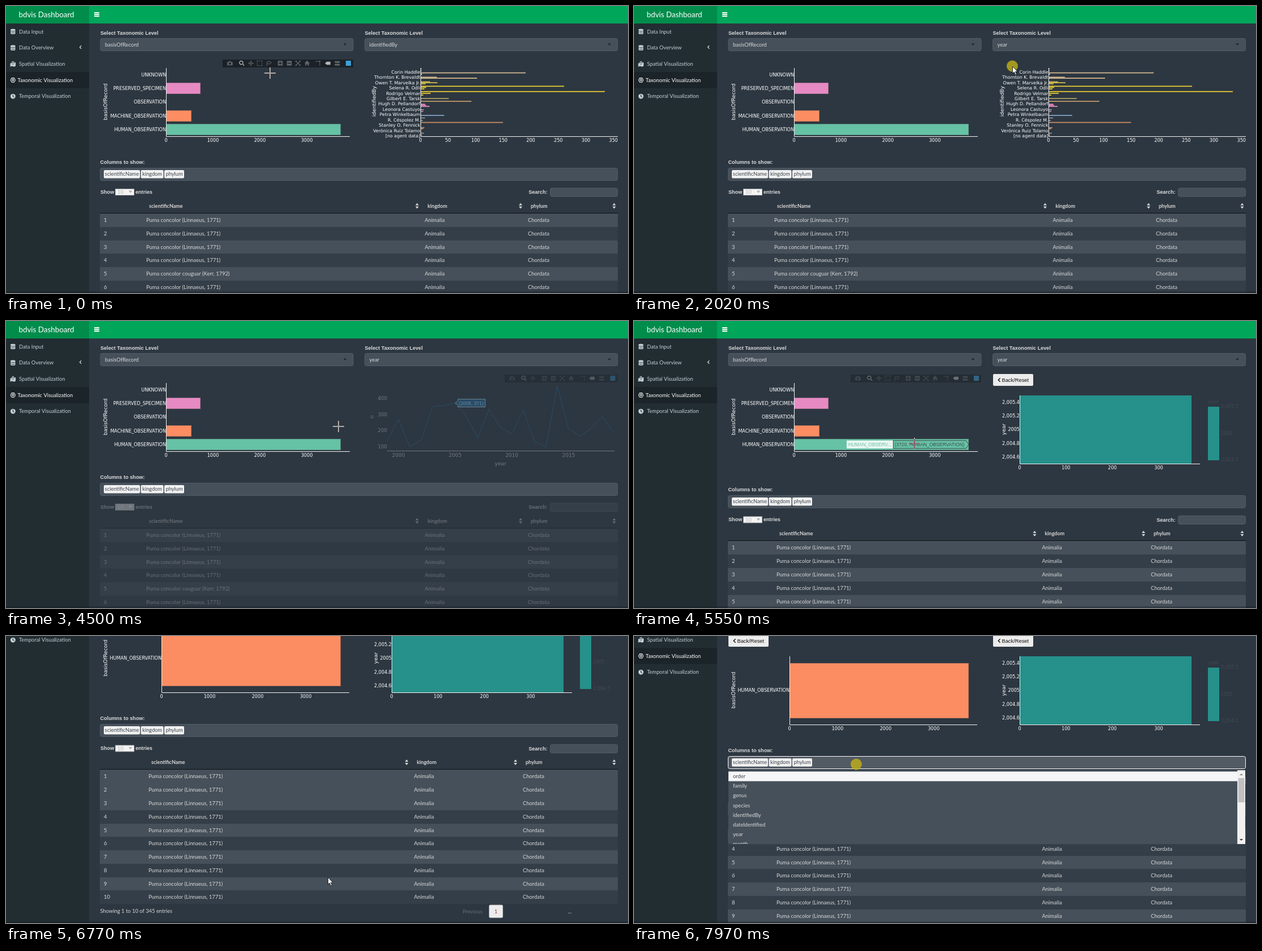
Recreate the animation shown at these times as an HTML page with a canvas. Size 1100x509 px, loop 8 s.

```html
<!DOCTYPE html>
<html lang="en">
<head>
<meta charset="utf-8">
<title>bdvis Dashboard</title>
<style>
html, body { margin: 0; width: 100%; height: 100%; overflow: hidden; background: #2d3741; }
canvas { display: block; width: 1100px; height: 509px; }
</style>
</head>
<body>
<canvas id="stage"></canvas>
<script>
const W = 1100, H = 509, LOOP = 8000;
const canvas = document.getElementById('stage'), c = canvas.getContext('2d');
const dpr = window.devicePixelRatio || 1;
canvas.width = W * dpr;
canvas.height = H * dpr;

const UI = 'Lato, sans-serif', PLOT = '"DejaVu Sans", sans-serif', ARIAL = '"Liberation Sans", sans-serif';
const BG = '#2d3741', PANEL = '#46505a', INK = '#d8d8d8';

// Moments when the page changes
const PICK = 1880, LINE = 2650, DRILL = 4550, DRILL_LEFT = 5850, MENU = 7970;

const ramp = (t, a, b) => Math.min(1, Math.max(0, (t - a) / (b - a)));
const ease = p => p < .5 ? 2 * p * p : 1 - 2 * (1 - p) * (1 - p);
const within = (t, a, b) => t >= a && t < b;

function rect(x, y, w, h, fill) {
  c.fillStyle = fill;
  c.fillRect(x, y, w, h);
}
function round(x, y, w, h, r, fill, stroke) {
  c.beginPath();
  c.roundRect(x, y, w, h, r);
  c.fillStyle = fill;
  c.fill();
  if (stroke) { c.strokeStyle = stroke; c.lineWidth = 1; c.stroke(); }
}
function poly(points, fill, stroke) {
  c.beginPath();
  points.forEach(([x, y]) => c.lineTo(x, y));
  if (fill) { c.closePath(); c.fillStyle = fill; c.fill(); }
  if (stroke) { c.strokeStyle = stroke; c.lineWidth = 1; c.stroke(); }
}
// y is the middle of the capitals; upright baselines sit on whole pixels
function text(s, x, y, { size = 9.4, color = INK, font = UI, align = 'left', bold = false, turn = false } = {}) {
  const drop = size * .36;
  c.save();
  c.translate(x, turn ? y : Math.round(y + drop));
  if (turn) c.rotate(-Math.PI / 2);
  c.font = `${bold ? 'bold ' : ''}${size}px ${font}`;
  c.textAlign = align;
  c.fillStyle = color;
  c.fillText(s, 0, turn ? drop : 0);
  c.restore();
}
const label = (s, x, y, align) => text(s, x, y, { size: 9.1, font: ARIAL, bold: true, align, color: '#dcdcdc' });
const tick = (s, x, y, align = 'center', size = 8.1) => text(s, x, y, { size, align, font: PLOT, color: '#fff' });
const title = (s, x, y) => text(s, x, y, { size: 9.1, align: 'center', font: PLOT, color: '#fff', turn: true });

function group(alpha, draw) {
  if (alpha <= 0) return;
  c.save();
  c.globalAlpha *= alpha;
  draw();
  c.restore();
}
function icon(path, x, y, color, scale = 1) {
  c.save();
  c.translate(x, y);
  c.scale(scale, scale);
  c.translate(-5, -5);
  c.fillStyle = color;
  c.fill(new Path2D(path), 'evenodd');
  c.restore();
}
const ICONS = {
  camera: 'M0 2.5h2.5l1-1.5h3l1 1.5h2.5v6.5h-10zM5 3.5a2 2 0 1 0 .01 0z',
  zoom: 'M4 0a4 4 0 1 0 .01 0zM4 1.5a2.5 2.5 0 1 0 .01 0zM6.5 7.5l1-1 2.5 2.5-1 1z',
  pan: 'M5 0l2 2.5h-1.4v1.9h1.9v-1.4l2.5 2-2.5 2v-1.4h-1.9v1.9h1.4l-2 2.5-2-2.5h1.4v-1.9h-1.9v1.4l-2.5-2 2.5-2v1.4h1.9v-1.9h-1.4z',
  box: 'M0 0h3v1h-2v2h-1zM7 0h3v3h-1v-2h-2zM0 7h1v2h2v1h-3zM9 7h1v3h-3v-1h2zM4 0h2v1h-2zM4 9h2v1h-2zM0 4h1v2h-1zM9 4h1v2h-1z',
  lasso: 'M5.5 1a4.5 3 0 1 0 .01 0zM5.5 2.2a3.3 1.8 0 1 0 .01 0zM1.5 6l1.2.6-1 3.4h-1.2z',
  plus: 'M.5 .5h9v9h-9zM4.3 2v2.3h-2.3v1.4h2.3v2.3h1.4v-2.3h2.3v-1.4h-2.3v-2.3z',
  minus: 'M.5 .5h9v9h-9zM2 4.3h6v1.4h-6z',
  auto: 'M0 0h3l-1 1 3 3 3-3-1-1h3v3l-1-1-3 3 3 3 1-1v3h-3l1-1-3-3-3 3 1 1h-3v-3l1 1 3-3-3-3-1 1z',
  home: 'M5 0l5 5h-1.5v4.5h-2.5v-3h-2v3h-2.5v-4.5h-1.5z',
  spike: 'M0 1h7v1h-7zM7 0h2v3h-2zM7.5 3h1v7h-1z',
  tag: 'M0 5l3-3h7v6h-7z',
  tags: 'M0 2.5l1.5-1.5h8.5v3.5h-8.5zM0 7.5l1.5-1.5h8.5v3.5h-8.5z',
  database: 'M.5 1.6a4.5 1.6 0 0 1 9 0v1a4.5 1.6 0 0 1-9 0zM.5 4.1q4.5 2.4 9 0v1.6a4.5 1.6 0 0 1-9 0zM.5 7.1q4.5 2.4 9 0v1.3a4.5 1.6 0 0 1-9 0z',
  map: 'M0 4l2.5-1 1 2 1.5 2 1.5-2 1-2 2.5-1v7l-3.3 1.3-3.4-1.3-3.3 1.3zM5 0a2.3 2.3 0 0 1 2.3 2.3q0 1.2-2.3 3.9-2.3-2.7-2.3-3.9a2.3 2.3 0 0 1 2.3-2.3zM5 1.4a.9.9 0 1 0 .01 0z',
  atom: 'M2.5 .5h5l2.5 4.5-2.5 4.5h-5l-2.5-4.5zM3 1.6l-1.9 3.4 1.9 3.4h4l1.9-3.4-1.9-3.4zM5 2.8a2.2 2.2 0 1 0 .01 0zM5 4a1 1 0 1 0 .01 0z',
  clock: 'M5 .3a4.7 4.7 0 1 0 .01 0zM4.4 2h1.2v2.8l1.8 1.3-.7.9-2.3-1.7z',
  back: 'M6.8 .5l1.2 1.2-3.3 3.3 3.3 3.3-1.2 1.2-4.5-4.5z'
};

function modebar(x, xs, names) {
  rect(x, 95, xs.at(-1) + 8.5 - x, 14, '#1b2127');
  names.forEach((n, i) => icon(ICONS[n], xs[i], 101.5, n === 'zoom' || n === 'tag' ? '#b4b8ba' : '#5d646a', .95));
  rect(xs.at(-1) - 4.5, 97, 9, 9, '#3f9fd8');
}
const LEFT_TOOLS = ['camera', 'zoom', 'pan', 'box', 'lasso', 'plus', 'minus', 'auto', 'home', 'spike', 'tag', 'tags'];
const RIGHT_TOOLS = LEFT_TOOLS.filter(n => n !== 'box' && n !== 'lasso');
const leftBar = () => modebar(383, [396, 417, 433, 448.5, 464.5, 485, 501, 516.5, 532.5, 552, 569, 585.5, 605.5], LEFT_TOOLS);
const rightBar = () => modebar(882, [895, 916, 931.5, 952, 968, 983.5, 999.5, 1020, 1036, 1053, 1073], RIGHT_TOOLS);

function bar(x, y, w, h, fill) {
  rect(x, y, w, h, fill);
  c.strokeStyle = 'rgba(68,68,68,.35)';
  c.lineWidth = 1;
  c.strokeRect(x + .5, y + .5, w - 1, h - 1);
}
function axes(x, top, bottom, right) {
  poly([[x + .5, top], [x + .5, bottom + .5], [right, bottom + .5]], null, '#f4f4f4');
}
function scale(x, step, unit, count, y, size) {
  for (let i = 0; i < count; i++) tick(String(i * unit), x + i * step, y, 'center', size);
}
function backButton(x) {
  round(x, 94, 71, 21, 2, '#ececec');
  icon(ICONS.back, x + 10.5, 104.5, '#111', .85);
  text('Back/Reset', x + 15.5, 104.5, { size: 9.3, font: ARIAL, color: '#111' });
}

function recordBars() {
  const rows = [['UNKNOWN'], ['PRESERVED_SPECIMEN', 61, '#e78ac3'], ['OBSERVATION'],
    ['MACHINE_OBSERVATION', 45, '#fc8d62'], ['HUMAN_OBSERVATION', 309, '#66c2a5']];
  rows.forEach(([name, w, color], i) => {
    const y = 121.8 + i * 24.3;
    if (w) bar(283, Math.round(y - 9.8), w, 20, color);
    tick(name, 283, y, 'right');
  });
  axes(283, 110, 231, 608);
  scale(283, 83, 1000, 4, 238.5);
  title('basisOfRecord', 176, 170);
}
function recordLabel() {
  rect(376, 212, 82, 14, 'rgba(255,255,255,.85)');
  text('HUMAN_OBSERV...', 379, 219, { size: 8.4, font: ARIAL, color: '#66c2a5' });
  poly([[458.5, 212], [587, 212], [592, 219], [587, 226], [458.5, 226], [458.5, 212]], '#66c2a5', '#3b4a48');
  text('(3720, HUMAN_OBSERVATION)', 461, 219, { size: 8.4, font: ARIAL, color: '#3b4a48' });
}
function humanBar() {
  backButton(167);
  bar(275, 144, 317, 98, '#fc8d62');
  axes(275, 132, 253, 607);
  tick('HUMAN_OBSERVATION', 275, 192.3, 'right');
  scale(275, 85, 1000, 4, 260.5);
  title('basisOfRecord', 176, 192);
}

const PEOPLE = ['Corin Haddle', 'Thornton K. Brevaldt', 'Owen T. Marvelka Jr.', 'Selena R. Odli', 'Rodrigo Velmar',
  'Gilbert E. Tarsk', 'Hugh D. Pellandorf', 'Leonora Castuyo', 'Petra Winkelbaum', 'R. Céspolez M.',
  'Stanley O. Fennick', 'Verónica Ruiz Tolamo', '[no agent data]'];
const BARS = [
  ['#d9bc94', [111, 2], [115, 2], [118.5, 186], [121, 3], [126.3, 29], [128, 100]],
  ['#d8c04a', [134.5, 17], [136, 30], [138, 9]],
  ['#f0d233', [142.3, 254], [144.3, 10], [147, 7], [151.7, 326], [154.8, 18], [158, 5]],
  ['#b3a265', [164, 50]], ['#c7a06d', [169, 90]],
  ['#e78ac3', [174.2, 8], [176, 10], [178, 16]], ['#b490b5', [184, 6], [187, 5]],
  ['#86a8c8', [194, 42]], ['#8f9aa2', [198.5, 8], [203, 4]],
  ['#cf9068', [206.5, 146], [215.7, 7], [217.5, 5]], ['#a8938a', [225.5, 6], [229, 3]]];
function peopleBars() {
  for (const [color, ...bars] of BARS) for (const [y, w] of bars) rect(733, y - .8, w, 1.7, color);
  axes(733, 110, 231, 1082);
  PEOPLE.forEach((name, i) => tick(name, 732.5, 117 + i * 9.43, 'right', 7.9));
  scale(733, 48.75, 50, 8, 238.5);
  title('identifiedBy', 651, 169);
}

const YEARLY = [213, 174, 223, 211, 151.5, 150, 145.5, 170, 207, 156, 189, 200, 158, 214, 223.5, 115, 191, 204, 190, 170, 200]
  .map((y, i) => [674 + i * 20.06, y]);
function yearLine(x, y) {
  c.lineJoin = 'round';
  poly(YEARLY, null, '#1f77b4');
  poly([[674, 230.5], [1076, 230.5]], null, '#f4f4f4');
  for (let i = 0; i < 4; i++) {
    tick(String(2000 + i * 5), 694 + i * 100.3, 237.5, 'center', 9);
    tick(String(100 + i * 100), 674, 223 - i * 28.6, 'right', 8.6);
  }
  text('year', 874.5, 253, { size: 9.2, font: PLOT, color: '#fff', align: 'center' });
  title('n', 647, 170);
  const gaps = YEARLY.map(p => Math.hypot(p[0] - x, p[1] - y)), best = Math.min(...gaps);
  if (best > 20) return;
  const i = gaps.indexOf(best), [px, py] = YEARLY[i];
  const n = i === 6 ? 371 : Math.round(100 + (223 - py) * 3.5);
  poly([[px, py], [px + 5, py - 4], [px + 5, py - 7], [px + 53, py - 7], [px + 53, py + 7],
    [px + 5, py + 7], [px + 5, py + 4], [px, py]], '#1f77b4', '#fff');
  text(`(${1999 + i}, ${n})`, px + 7, py, { size: 8.4, font: ARIAL, color: '#fff' });
}
function yearBar() {
  backButton(635);
  rect(682, 132, 304, 121, '#26908b');
  axes(682, 132, 253, 1001);
  ['2,005.4', '2,005.2', '2005', '2,004.8', '2,004.6'].forEach((s, i) => tick(s, 682, 144 + i * 24.25, 'right'));
  scale(682, 82, 100, 4, 260.5);
  title('year', 654, 192);
  rect(1015, 152, 20, 95, '#26908b');
  const dim = { size: 8.1, font: PLOT, color: '#414a53' };
  text('year', 1016, 143.5, dim);
  ['2,005.5', '2005', '2,004.5'].forEach((s, i) => text(s, 1038, 151.5 + i * 47.5, dim));
}

function field(x, y, w, focus) {
  round(x + .5, y + .5, w - 1, 22, 3, focus ? '#525a64' : PANEL, focus ? '#fff' : '#525c66');
}
function select(x, value, focus) {
  label('Select Taxonomic Level', x + .5, 47.5);
  field(x, 57, 448, focus);
  text(value, x + 8.5, 68.3);
  poly([[x + 430, 66.5], [x + 436, 66.5], [x + 433, 70]], '#20262c');
}
function menu(x, y, w, h, items, chosen) {
  c.save();
  c.beginPath();
  c.rect(x, y, w, h);
  c.clip();
  rect(x, y, w, h, PANEL);
  items.forEach((s, i) => {
    const top = y + 2.4 + i * 17.1;
    if (i === chosen) rect(x, top, w, 17.1, '#f6f6f8');
    text(s, x + 8, top + 8.5, { color: i === chosen ? '#3c444c' : INK });
  });
  c.restore();
}
function columnMenu(y) {
  menu(167, y, 900, 131, ['order', 'family', 'genus', 'species', 'identifiedBy', 'dateIdentified', 'year', 'month'], 0);
  rect(1067, y, 14, 131, '#f1f1f1');
  rect(1068.5, y + 14, 11, 43, '#c1c1c1');
  poly([[1071, y + 9], [1077, y + 9], [1074, y + 6]], '#8a8a8a');
  poly([[1071, y + 122], [1077, y + 122], [1074, y + 125]], '#333');
}

function chips(dy, focus) {
  label('Columns to show:', 166.5, 277 + dy);
  field(166, 287 + dy, 916, focus);
  [['scientificName', 173, 64], ['kingdom', 238.5, 40], ['phylum', 280, 35]].forEach(([s, x, w]) => {
    round(x, 291 + dy, w, 14.5, 2, '#f1f1f1');
    text(s, x + w / 2, 298 + dy, { size: 9.3, color: '#3c444c', align: 'center' });
  });
}
function table(dy, cols, sorts, hover, drilled) {
  label('Show', 167, 329.5 + dy);
  round(193.5, 324.5 + dy, 33, 11, 0, '#f4f4f4', '#a9a9a9');
  text('10', 197, 330 + dy, { color: '#b5b5b5', size: 9.3 });
  poly([[217, 327.5 + dy], [223, 327.5 + dy], [220, 332 + dy]], '#b0b0b0');
  label('entries', 229, 329.5 + dy);
  label('Search:', 957.5, 330 + dy, 'right');
  round(962.5, 323 + dy, 119, 15, 3, PANEL, '#525c66');
  ['scientificName', 'kingdom', 'phylum'].forEach((s, i) =>
    text(s, cols[i] + 5, 354.5 + dy, { size: 9, bold: true }));
  for (const x of sorts) {
    poly([[x - 3, 353.6 + dy], [x + 3, 353.6 + dy], [x, 349.6 + dy]], '#d8d8d8');
    poly([[x - 3, 355.6 + dy], [x + 3, 355.6 + dy], [x, 359.6 + dy]], '#d8d8d8');
  }
  const rowTop = i => Math.round(368 + dy + i * 23.78);
  for (let i = 0; i < 10; i++) {
    const y = rowTop(i), mid = y + 11.9;
    rect(166, y, 916, rowTop(i + 1) - y, i % 2 === 0 || i === hover ? PANEL : '#343e48');
    text(String(i + 1), 173, mid);
    text(i === 4 && !drilled ? 'Puma concolor couguar (Kerr, 1792)' : 'Puma concolor (Linnaeus, 1771)', cols[0], mid);
    text('Animalia', cols[1], mid);
    text('Chordata', cols[2], mid);
  }
  rect(166, rowTop(0) - 1, 916, 1, '#0c0f12');
  const y = 618.2 + dy;
  text('Showing 1 to 10 of 345 entries', 166.5, y);
  text('Previous', 807.5, y + .8, { color: '#626b74' });
  round(854.5, y - 10.5, 24, 22.5, 2, '#ececec', '#b9b9b9');
  text('1', 866.5, y + .8, { color: '#8a3d3d', align: 'center' });
  text('...', 993.5, y + .8);
}

function sidebar(s) {
  rect(0, 0, 147, H, '#222d32');
  c.save();
  c.translate(0, -s);
  rect(0, 117, 147, 29, '#1b2428');
  [['database', 'Data Input'], ['database', 'Data Overview'], ['map', 'Spatial Visualization'],
    ['atom', 'Taxonomic Visualization'], ['clock', 'Temporal Visualization']].forEach(([n, s], i) => {
    const y = 45.3 + i * 28.7, color = i === 3 ? '#fff' : '#c2cfd5';
    icon(ICONS[n], 12.3, y, color, .95);
    text(s, i === 3 ? 20.5 : 23, y, { size: 9.3, color });
  });
  icon(ICONS.back, 131.5, 73, '#d5dde1', .7);
  rect(147, 0, W, 31, '#00a65a');
  rect(0, 0, 147, 31, '#008d4c');
  text('bdvis Dashboard', 71.5, 14.8, { size: 13.4, color: '#fff', align: 'center' });
  for (let i = 0; i < 3; i++) rect(156, 11 + i * 3, 9, 2, '#fff');
  c.restore();
}

// Pointer stops: time, x, y
const STOPS = [[0, 467, 119], [50, 467, 119], [420, 660, 112], [800, 700, 68], [1270, 700, 68], [1750, 669, 107],
  [2620, 669, 107], [2900, 740, 162], [3180, 740, 162], [3470, 796, 147], [3900, 796, 147], [4320, 588, 187],
  [4650, 588, 187], [5200, 496, 217], [5700, 496, 217], [6110, 569, 428], [7400, 569, 428], [7820, 393, 228], [8000, 393, 228]];
const CLICKS = [[880, 990], [1840, 2070], [3700, 3850], [5310, 5450], [7890, 8001]];
function pointer(t) {
  const i = Math.max(1, STOPS.findIndex(s => s[0] > t)), [a, x, y] = STOPS[i - 1], [b, u, v] = STOPS[i];
  const p = ease(ramp(t, a, b));
  return [x + (u - x) * p, y + (v - y) * p];
}
function drawPointer(t, x, y) {
  if (CLICKS.some(([a, b]) => within(t, a, b))) {
    c.beginPath();
    c.arc(x, y - .5, 10, 0, 7);
    c.fillStyle = 'rgba(190,175,25,.82)';
    c.fill();
  }
  const inLeft = t < DRILL_LEFT && x > 283 && x < 610 && y > 110 && y < 232;
  const inRight = within(t, LINE, DRILL) && x > 674 && x < 1076 && y > 110 && y < 231;
  const inField = t < 1500 && y < 79 || t > 7780;
  c.save();
  if (inLeft || inRight) {
    c.globalCompositeOperation = 'difference';
    rect(x - 10, y - .8, 20, 1.6, '#fff');
    rect(x - .8, y - 10, 1.6, 9.2, '#fff');
    rect(x - .8, y + .8, 1.6, 9.2, '#fff');
  } else if (inField) {
    if (t < MENU) {
      rect(x - .5, y - 6, 1, 12, '#e8e8e8');
      rect(x - 2.5, y - 7, 5, 1, '#e8e8e8');
      rect(x - 2.5, y + 6, 5, 1, '#e8e8e8');
    }
  } else {
    c.translate(x + .5, y);
    poly([[0, 0], [0, 12.6], [2.8, 10], [4.9, 15], [7, 14.1], [4.9, 9.3], [8.7, 9.3], [0, 0]], '#fff', '#20262c');
  }
  c.restore();
}

function draw(t) {
  const [px, py] = pointer(t), drilled = t >= DRILL;
  const scroll = t < 6540 ? 0 : Math.round(153 * ease(ramp(t, 6520, 6770)) - 57.3 * ease(ramp(t, 7130, 7380)));
  const dy = drilled ? 22.4 : 0;
  const choosing = within(t, 900, PICK);
  const fade = (a, b) => 1 - .67 * ramp(t, a, b);

  rect(0, 0, W, H, BG);
  c.save();
  c.translate(0, -scroll);
  select(166.5, 'basisOfRecord', false);
  select(634, t < PICK ? 'identifiedBy' : 'year', choosing);

  if (t < DRILL_LEFT) group(fade(5570, 5720), () => {
    recordBars();
    if (t > 4650 && px < 592 && py > 209) recordLabel();
    group(t < 4500 ? 1 - ramp(t, 100, 300) : ramp(t, 4600, 4700) * (1 - ramp(t, 5500, 5600)), leftBar);
  });
  else humanBar();

  if (t < LINE) group(fade(2110, 2250), () => {
    peopleBars();
    group(ramp(t, 320, 400) * (1 - ramp(t, 600, 750)), rightBar);
  });
  else if (!drilled) group(fade(3800, 3950), () => {
    const held = t > 3700;
    yearLine(held ? 796 : px, held ? 147 : py);
    group(ramp(t, 2740, 2860), rightBar);
  });
  else yearBar();

  chips(Math.floor(dy), t >= MENU);
  // The hovered row only refreshes once scrolling has settled
  const hover = t > 5700 ? Math.floor((py + (t < 6850 ? 0 : scroll) - 368 - dy) / 23.78) : -1;
  const shown = t < DRILL ? fade(3800, 3950) : t < DRILL_LEFT ? fade(5570, 5720) : 1;
  group(shown, () => drilled
    ? table(dy, [252, 721.5, 914], [708.5, 901, 1075.5], hover, true)
    : table(dy, [248, 740.5, 923], [727, 910, 1075.5], hover, false));

  if (choosing) menu(634.5, 80, 447, 77, ['identifiedBy', 'year', 'month', 'day'], py > 99 ? 1 : 0);
  if (t >= MENU) columnMenu(334);
  c.restore();

  sidebar(scroll);
  rect(0, 506.5, W, 3, 'rgba(15,22,28,.4)');
  drawPointer(t, px, py);
}

const start = performance.now();
function frame() {
  c.setTransform(dpr, 0, 0, dpr, 0, 0);
  draw((performance.now() - start) % LOOP);
  requestAnimationFrame(frame);
}
frame();
</script>
</body>
</html>
```
